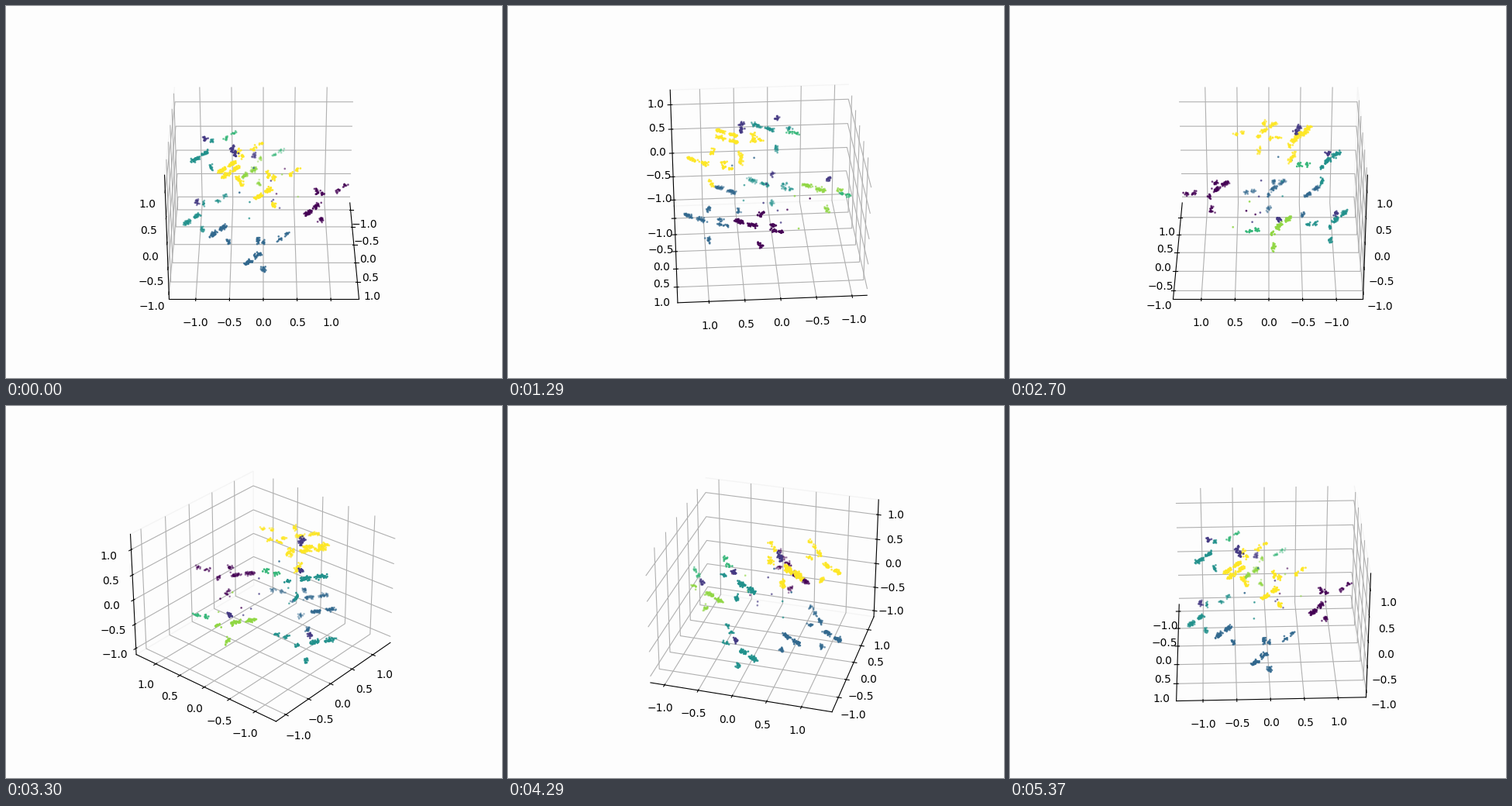
Recreate the animation shown at these times as a matplotlib script. Size 640 px wide and 480 px high, loop 5400 ms.

```python
import numpy as np
import matplotlib.pyplot as plt
from matplotlib.animation import FuncAnimation

FRAMES, INTERVAL = 180, 30
PURPLE, INDIGO, BLUE, TEAL, GREEN, LIME, YELLOW = range(7)
PAPER = "#fdfdfd"

# Every group repeats one motif: a bar in two halves, a foot below,
# a tip above, a spot to the side and a tail further out.
BAR = np.array((.183, -.139, 0))
FOOT = np.array((-.097, .080, -.355))
TIP = np.array((-.113, .002, .211))
SPOT = np.array((-.276, .092, .054))
TAIL = np.array((-.312, .382, .138))

# centre, then the colours of body, tip and tail (None leaves a part out)
GROUPS = [
    ((.00, -.88, .75), TEAL, INDIGO, GREEN),
    ((.06, -1.03, -.48), TEAL, INDIGO, TEAL),
    ((.35, .81, -.07), PURPLE, PURPLE, PURPLE),
    ((.99, .07, .70), YELLOW, YELLOW, YELLOW),
    ((.55, -.46, .91), YELLOW, INDIGO, YELLOW),
    ((.55, -.41, .81), YELLOW, INDIGO, None),
    ((1.05, -.08, -.54), BLUE, BLUE, BLUE),
    ((.58, -.61, -.34), BLUE, None, None),
    ((-.69, -.15, -.05), LIME, INDIGO, GREEN),
]

rng = np.random.default_rng(4)
points, labels = [], []


def add_blob(centre, stretch, label, count=18):
    if label is None:
        return
    t = np.linspace(-1, 1, count)[:, None]
    noise = rng.normal(0, .016, (count, 3))
    points.extend(centre + t * stretch + noise)
    labels.extend([label] * count)


def add_group(centre, body, tip, tail):
    centre = np.array(centre)
    for end in (0, BAR):
        add_blob(centre + end, .28 * BAR, body, 36)
    add_blob(centre + FOOT, .13 * FOOT, body)
    add_blob(centre + TIP, .16 * TIP, tip)
    if tip is not None:
        add_blob(centre + SPOT, .08 * SPOT, body, 12)
    for side in (-1, 1):
        add_blob(centre + (1 + .14 * side) * TAIL, .05 * TAIL, tail, 10)


for group in GROUPS:
    add_group(*group)

# single points scattered along a slanted sheet through the middle
for i, label in enumerate(2 * [BLUE, TEAL] + 4 * [INDIGO] + 2 * [PURPLE, LIME]):
    t = i / 11
    points.append(rng.normal((.5 - .9 * t, -.35 + .8 * t, .08), (.08, .08, .25)))
    labels.append(label)

fig = plt.figure(figsize=(6.4, 4.8), dpi=100, facecolor=PAPER)
ax = fig.add_subplot(projection="3d", facecolor=PAPER)
ax.scatter(*np.array(points).T, c=labels, cmap="viridis", s=1)
ax.set(xlim=(-1.21, 1.435), ylim=(-1.394, 1.417), zlim=(-1.13, 1.30))

for axis in (ax.xaxis, ax.yaxis, ax.zaxis):
    axis.pane.set_facecolor("none")
    axis.pane.set_edgecolor("none")
ax.yaxis.pane.set_edgecolor("#ececec")


def update(i):
    ax.view_init(elev=30, azim=i * 360 / FRAMES)
    return ax,


anim = FuncAnimation(fig, update, frames=FRAMES, interval=INTERVAL,
                     repeat=True, repeat_delay=0)
plt.show()
```
